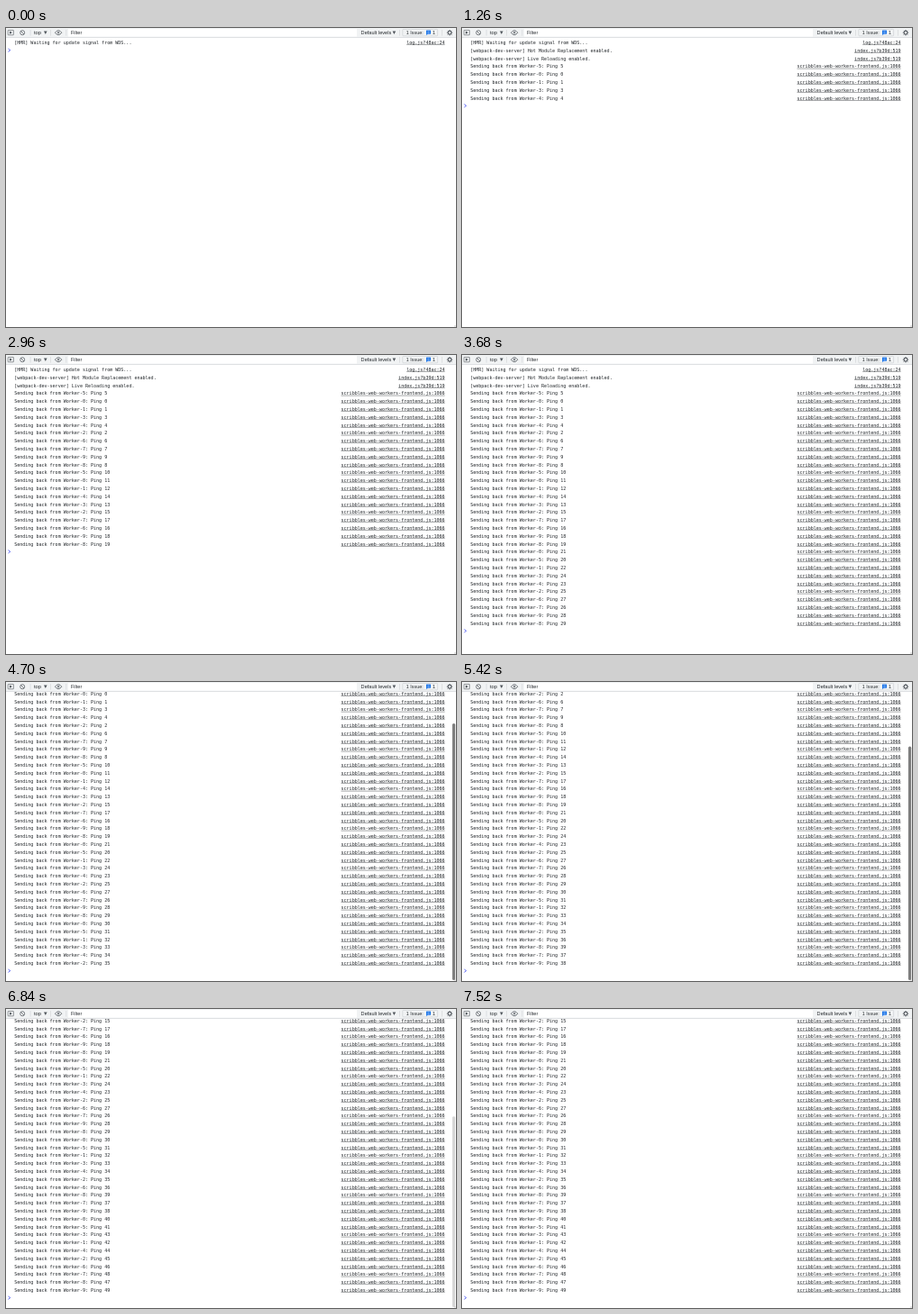
These frames come from a looping animation (499 by 332 pixels, 7.54 s). An HTML page with a canvas:

```html
<!DOCTYPE html>
<html lang="en">
<head>
<meta charset="utf-8">
<title>Console</title>
<style>
  html, body { margin: 0; width: 100%; height: 100%; overflow: hidden; background: #fff; }
  canvas { display: block; width: 499px; height: 332px; }
</style>
</head>
<body>
<canvas id="stage"></canvas>
<script>
const W = 499, H = 332, LOOP = 7540;
const BAR = 10.8, PITCH = 8.8, FIRST = 16, LAST = 312;
const MONO = '"DejaVu Sans Mono", monospace';
const SANS = '"Liberation Sans", Arial, sans-serif';
const INK = '#24282c', ICON = '#50565c', LINE = '#c8cbcf';

const canvas = document.getElementById('stage');
const ctx = canvas.getContext('2d');
const ratio = window.devicePixelRatio || 1;
canvas.width = Math.round(W * ratio);
canvas.height = Math.round(H * ratio);

// Each batch: worker ids in arrival order, and the ping each one answers.
const batches = [
  ['5013426798', [5, 0, 1, 3, 4, 2, 6, 7, 9, 8]],
  ['5014327698', [10, 11, 12, 14, 13, 15, 17, 16, 18, 19]],
  ['0513426798', [21, 20, 22, 24, 23, 25, 27, 26, 28, 29]],
  ['0513426879', [30, 31, 32, 33, 34, 35, 36, 39, 37, 38]],
  ['0531426789', [40, 41, 43, 42, 44, 45, 46, 48, 47, 49]]
];
const BATCH_START = 1180, BATCH_GAP = 1140, PING_GAP = 20;

const rows = [
  { at: 0, text: '[HMR] Waiting for update signal from WDS...', link: 'log.js?48ac:24' },
  { at: 60, text: '[webpack-dev-server] Hot Module Replacement enabled.', link: 'index.js?b39d:519' },
  { at: 60, text: '[webpack-dev-server] Live Reloading enabled.', link: 'index.js?b39d:519' }
];
batches.forEach(([workers, pings], b) => pings.forEach((ping, i) => rows.push({
  at: BATCH_START + b * BATCH_GAP + i * PING_GAP,
  text: `Sending back from Worker-${workers[i]}: Ping ${ping}`,
  link: 'scribbles-web-workers-frontend.js:1066'
})));

// Set at 100px and scaled down, so small sizes keep fractional advances.
function text(str, x, y, size, family, color = INK, align = 'left') {
  const k = size / 100;
  ctx.save();
  ctx.translate(x, y);
  ctx.scale(k, k);
  ctx.font = '100px ' + family;
  ctx.textAlign = align;
  ctx.fillStyle = color;
  ctx.fillText(str, 0, 0);
  const width = ctx.measureText(str).width * k;
  ctx.restore();
  return width;
}

function rect(x, y, w, h, color) {
  ctx.fillStyle = color;
  ctx.fillRect(x, y, w, h);
}

function path(points, color, width) {
  ctx.beginPath();
  points.forEach(([x, y]) => ctx.lineTo(x, y));
  if (width) {
    ctx.strokeStyle = color;
    ctx.lineWidth = width;
    ctx.stroke();
  } else {
    ctx.fillStyle = color;
    ctx.fill();
  }
}

function ring(x, y, r, width, color = ICON) {
  ctx.beginPath();
  ctx.arc(x, y, r, 0, Math.PI * 2);
  ctx.strokeStyle = color;
  ctx.lineWidth = width;
  ctx.stroke();
}

function box(x, y, w, h, r, fill, stroke) {
  ctx.beginPath();
  ctx.roundRect(x, y, w, h, r);
  if (fill) { ctx.fillStyle = fill; ctx.fill(); }
  if (stroke) { ctx.strokeStyle = stroke; ctx.lineWidth = 0.6; ctx.stroke(); }
}

const caret = x => path([[x, 3.6], [x + 3.6, 3.6], [x + 1.8, 7]], ICON);

function drawIcons() {
  box(2.2, 2.4, 6.2, 5.4, 0.4, null, ICON);
  path([[4, 3.5], [6.9, 5.1], [4, 6.7]], ICON);

  ring(18.2, 5.2, 2.5, 0.75);
  path([[16.4, 3.4], [20, 7]], ICON, 0.75);

  ctx.beginPath();
  ctx.moveTo(54.4, 5.2);
  ctx.quadraticCurveTo(58.1, 0.2, 61.8, 5.2);
  ctx.quadraticCurveTo(58.1, 10.2, 54.4, 5.2);
  ctx.strokeStyle = ICON;
  ctx.lineWidth = 0.8;
  ctx.stroke();
  ring(58.1, 5.2, 0.8, 0.9);

  ring(492, 5.2, 1.9, 1.1);
  for (let i = 0; i < 8; i++) {
    const a = i * Math.PI / 4, c = Math.cos(a), s = Math.sin(a);
    path([[492 + 2.2 * c, 5.2 + 2.2 * s], [492 + 3.2 * c, 5.2 + 3.2 * s]], ICON, 1);
  }
}

function drawToolbar() {
  rect(0, 0, W, BAR, '#f1f3f4');
  rect(0, BAR - 0.5, W, 0.5, LINE);
  rect(69, 1, 320, 8.6, '#fff');
  [26.8, 49.2, 66.6, 436.2, 483.4].forEach(x => rect(x, 2, 0.5, 6.6, LINE));
  drawIcons();

  text('top', 31, 7, 5.8, SANS);
  caret(42);
  text('Filter', 72, 7.2, 5.5, SANS);
  text('Default levels', 393.6, 7, 5.6, SANS);
  caret(428.6);

  box(439.8, 1.4, 38.8, 7.4, 0.8, null, LINE);
  text('1 Issue:', 443.8, 7, 5.4, SANS);
  box(466, 2.5, 5, 4.2, 0.4, '#1a73e8');
  path([[466, 6], [468, 6.6], [466, 8]], '#1a73e8');
  rect(467.2, 3.7, 2.6, 0.4, '#fff');
  rect(467.2, 5, 2.6, 0.4, '#fff');
  text('1', 472.9, 7, 5.4, SANS);
}

function drawRow(row, y) {
  const base = y + 1.9;
  text(row.text, 9.2, base, 5.03, MONO);
  const width = text(row.link, 486.6, base, 5.03, MONO, INK, 'right');
  rect(486.6 - width, base + 0.55, width, 0.4, INK);
}

function drawScrollbar(scroll, idle) {
  const alpha = Math.max(0, Math.min(1, 1 - (idle - 750) / 250));
  if (!scroll || !alpha) return;
  const view = H - BAR;
  const size = view * view / (view + scroll);
  ctx.globalAlpha = alpha;
  box(494.9, H - size + 0.9, 3.3, size - 1.8, 1.6, '#7e7e7e');
  ctx.globalAlpha = 1;
}

function draw(t) {
  const shown = rows.filter(row => row.at <= t);
  const n = shown.length;
  const scroll = Math.max(0, FIRST + (n - 1) * PITCH - LAST);
  const rowY = i => FIRST + i * PITCH - scroll;

  ctx.setTransform(ratio, 0, 0, ratio, 0, 0);
  rect(0, 0, W, H, '#fff');
  shown.forEach((row, i) => { if (rowY(i) > 4) drawRow(row, rowY(i)); });

  const y = rowY(n) - 0.1;
  path([[2.5, y - 1.7], [4.7, y], [2.5, y + 1.7]], '#3f4df0', 0.85);

  drawScrollbar(scroll, t - shown[n - 1].at);
  rect(497.4, 330.6, 1.2, 0.8, '#9a9a9a');
  drawToolbar();
}

const start = performance.now();
function tick() {
  draw((performance.now() - start) % LOOP);
  requestAnimationFrame(tick);
}
tick();
</script>
</body>
</html>
```
